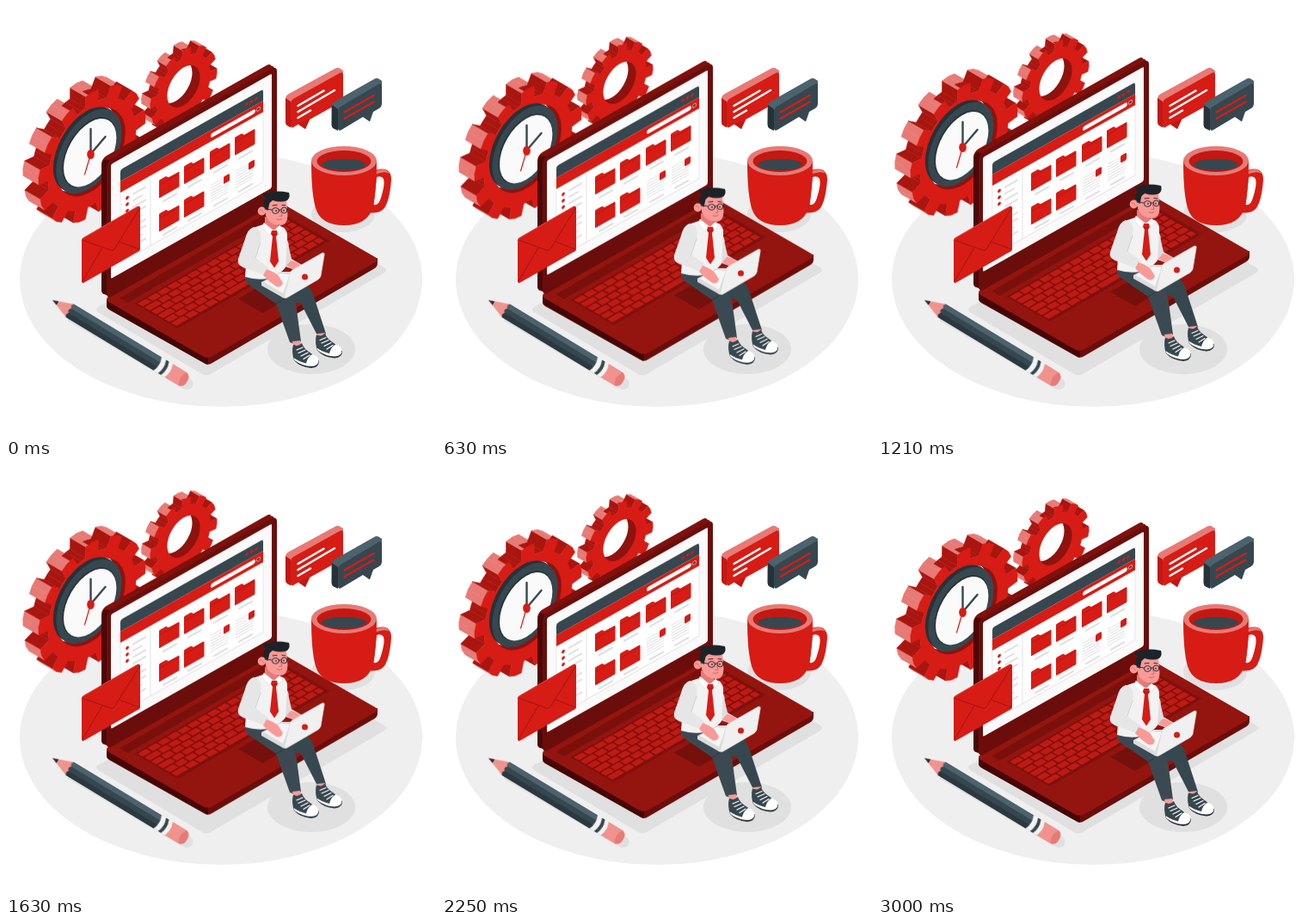
An HTML page for the animation above (3.04 s loop, 500 px wide and 500 px high).

```html
<!DOCTYPE html>
<html lang="en">
<head>
<meta charset="utf-8">
<title>Working at a laptop</title>
<style>
html, body { margin: 0; width: 100%; height: 100%; overflow: hidden; background: #fff; }
svg { display: block; width: 100%; height: 100%; }
.float { animation: float 3.04s linear infinite; }
@keyframes float {
  0%, 98.68%, 100% { transform: translateY(0); }
  49.34% { transform: translateY(-10px); }
}
.red { fill: #d61c15; }
.pink { fill: #e77a75; }
.slate { fill: #37474f; }
.night { fill: #263238; }
.skin { fill: #f99a97; }
.line { fill: none; stroke-linecap: round; stroke-linejoin: round; }
</style>
</head>
<body>
<svg viewBox="0 0 500 500">
  <defs>
    <clipPath id="hole"><circle r="22" transform="matrix(.866 -.5 0 1 206.5 93.5)"/></clipPath>
    <clipPath id="well"><circle r="46" transform="matrix(.866 -.5 0 1 99 170)"/></clipPath>
  </defs>

  <!-- floor and shadows -->
  <ellipse cx="250" cy="318" rx="234" ry="148" fill="#efefef"/>
  <g fill="#e0e0e0">
    <path d="M107 350Q103 353 107 356L228 428Q233 431 238 428L440 310Q444 307 440 304L320 236Z"/>
    <ellipse cx="355" cy="399" rx="51" ry="29"/>
    <ellipse cx="392" cy="242" rx="37" ry="21"/>
    <path d="M72 352L214 433Q220 438 216 444Q211 448 204 444L72 366Z"/>
  </g>

  <g class="float">
    <g id="smallGear"></g>
    <circle r="22" fill="#8e120e" transform="matrix(.866 -.5 0 1 206.5 93.5)"/>
    <g clip-path="url(#hole)"><circle r="22" fill="#fff" transform="matrix(.866 -.5 0 1 197.5 88.5)"/></g>

    <g id="bigGear"></g>
    <!-- clock -->
    <circle r="46" fill="#8e120e" transform="matrix(.866 -.5 0 1 99 170)"/>
    <g clip-path="url(#well)"><circle r="46" fill="#fff" transform="matrix(.866 -.5 0 1 88 164)"/></g>
    <circle r="44" class="night" transform="matrix(.866 -.5 0 1 93 166.5)"/>
    <circle r="44" class="slate" transform="matrix(.866 -.5 0 1 96.5 169)"/>
    <circle r="36.5" class="night" transform="matrix(.866 -.5 0 1 97 170)"/>
    <circle r="35.5" fill="#fafafa" transform="matrix(.866 -.5 0 1 97.7 170.700)"/>
    <g class="line">
      <path d="M98.5 172V143M98.5 172L115.5 152" stroke="#37474f" stroke-width="2.4"/>
      <path d="M98.5 172L91.5 196" stroke="#d61c15" stroke-width="1.2"/>
    </g>
    <ellipse cx="98.5" cy="172.5" rx="4.3" ry="5.5" class="red"/>

    <!-- laptop base -->
    <path d="M117 341V348.500Q117 351 120 353L231 415.500Q235 418 239 415.500L428 305.500Q432 303 432 299V293Z" fill="#6b0d0a"/>
    <path d="M117 341V348.500Q117 351 120 353L231 415.500Q233 416.800 235 416.800V400Z" fill="#450605"/>
    <g transform="matrix(.866 -.5 .866 .5 114 341)">
      <rect width="231" height="139" rx="6" fill="#94150f"/>
      <rect x="12" y="9" width="208" height="11" fill="#7a100c"/>
    </g>
    <g id="keys" transform="matrix(.866 -.5 .866 .5 153 346)">
      <rect x="-2" y="-2" width="204" height="58" fill="#7d110d"/>
      <rect x="73" y="62" width="54" height="33" fill="#76100c"/>
    </g>

    <!-- laptop lid -->
    <g id="screen" transform="matrix(1 -.565 0 1 133 190.5)">
      <g fill="#7f110d">
        <rect x="-22" y="-25.5" width="198" height="158" rx="6"/>
        <rect x="-19" y="-22.2" width="198" height="159" rx="6"/>
      </g>
      <path d="M-22 -15Q-22 -20 -19 -23L-12 -18V140L-20 133Q-22 131 -22 128Z" fill="#4c0806"/>
      <rect x="-16" y="-18.5" width="198" height="160" rx="6" fill="#6b0e0b"/>
      <rect x="-11" y="-12.5" width="187" height="133" rx="2" fill="#fafafa"/>
      <rect width="166" height="108" fill="#fff" stroke="#e3e3e3" stroke-width=".8"/>
      <path d="M0 13.500V3Q0 0 3 0H163Q166 0 166 3V13.500Z" class="slate"/>
      <path d="M0 13.500H166V26.500H0Z" class="red"/>
      <rect x="105" y="17.500" width="52" height="5" rx="2.5" fill="#fff"/>
      <circle cx="160.5" cy="20" r="2" class="slate" stroke="#f0b5b2" stroke-width=".8"/>
      <path d="M35 26.500V108" stroke="#e3e3e3"/>
    </g>

    <!-- man -->
    <g>
      <path d="M322 268Q329 270 329 281L332 294L344 301L339 308L322 302Z" fill="#dedede"/>
      <path d="M331 296Q341 298 343 303L338 308L326 302Z" class="skin"/>
      <!-- far leg -->
      <path d="M318 322L350 325Q356 329 358 338L372 381Q366 385 361 381L343 346L318 340Z" class="slate"/>
      <path d="M362 381L371 380L372 388L363 389Z" class="skin"/>
      <!-- near leg -->
      <path d="M279 310Q275 318 282 324L314 346L330 391Q337 395 343 390L338 353Q337 339 327 333L312 320Z" fill="#3b4a52"/>
      <path d="M314 346Q321 344 327 335" class="line" stroke="#263238" stroke-width=".8"/>
      <path d="M333 390L342 389L344 398L335 400Z" class="skin"/>
      <g id="shoes"></g>
      <!-- shirt, neck and tie -->
      <path d="M290 257L302 253L322 257Q328 261 327 271L325 304Q309 324 278 315L281 276Q281 262 290 257Z" fill="#f2f2f2"/>
      <path d="M301 245L317 250L316 258Q310 264 301 255Z" fill="#e77a79"/>
      <path d="M300 252L311 261L305 266L298 257ZM312 261L318 255L322 259L317 266Z" fill="#fff" stroke="#dedede" stroke-width=".6"/>
      <path d="M309 261L315 261L316 265L314 268L317 297L312 304.500L307 297L310 268L308 265Z" class="red"/>
      <path d="M309 266L315 266" stroke="#8e120e" stroke-width=".8"/>
      <!-- head -->
      <path d="M302 227Q311 221 326 225L327.500 243Q327.500 254.500 319 255Q307 255 302 244Z" class="skin"/>
      <path d="M300 235Q298 226 303 223.500Q298 221 299 217Q302 219 305 217.500Q313 214 329 217Q331 222 327 226Q320 229 310 226L306.500 229L304.500 238Z" fill="#1c2429"/>
      <ellipse cx="297.5" cy="238.5" rx="4.8" ry="5" class="skin"/>
      <path d="M295 237Q298 236 299 240" class="line" stroke="#d86865" stroke-width=".8"/>
      <g class="line" stroke="#263238">
        <path d="M301 236L309 237" stroke-width="1"/>
        <ellipse cx="313.5" cy="238" rx="4" ry="3.4" stroke-width="1"/>
        <ellipse cx="323.5" cy="237.5" rx="3.4" ry="3.4" stroke-width="1"/>
        <path d="M317.5 237H320M310 232L315 231.5M321 231.5L325 232" stroke-width="1"/>
        <path d="M319 238L321 244L318 244.5M315 248Q318 249.5 321 247.5" stroke="#c8504d" stroke-width=".7"/>
      </g>
      <circle cx="314" cy="238" r=".9" class="night"/>
      <circle cx="323" cy="237.7" r=".9" class="night"/>
      <!-- small computer -->
      <path d="M297 321L320 309L333 309L325 339Q323 341 320 338L297 325Z" fill="#dcdcdc"/>
      <path d="M300 321L319 311L330 312L322 334Z" fill="#f5f5f5"/>
      <!-- near arm -->
      <path d="M288 257Q281 259 278 271L270 294Q268 301 276 304L300 313L306 305L290 293L296 275Q299 260 288 257Z" fill="#e6e6e6"/>
      <path d="M290 293L296 275" class="line" stroke="#cfcfcf" stroke-width=".9"/>
      <path d="M303 306Q312 309 317 314L322 322Q320 328 314 326L306 320L299 313Z" class="skin"/>
      <path d="M333 307L368 287Q371 286.500 370 290L366 314Q365 316.500 363 318L327 339Q323 341 324 337L330 311Q331 308 333 307Z" fill="#f0f0f0" stroke="#dcdcdc" stroke-width=".7"/>
      <circle cx="347.5" cy="315" r="3.5" class="red"/>
    </g>
  </g>

  <!-- envelope -->
  <path d="M88 273Q88 270 91 269L153 233Q156 232 156 235V282Q156 285 153 286L91 321.500Q88 323 88 320Z" class="red"/>
  <path d="M88.500 272L122 284Q125 285 127 281L155.500 235M89 320L112 281M155 283L132 274" class="line" stroke="#a5130f" stroke-width="1"/>
  <path d="M88 273Q88 270 91 269L153 233.200" class="line" stroke="#e44a43" stroke-width="1"/>

  <!-- mug -->
  <path fill-rule="evenodd" class="red" d="M428 191Q448 185 448 202Q446 228 439 236Q433 242 419 240ZM431 199L427.500 231Q433 233 436 223Q441 207 439 201Q437 197 431 199Z"/>
  <path d="M429 192Q442 187 446 195Q441 191 429 196Z" class="pink"/>
  <path d="M355 180Q355 218 360 235Q366 255 393 255Q420 255 426 235Q431 218 431 180Z" class="red"/>
  <ellipse cx="393" cy="180" rx="38" ry="17" class="pink"/>
  <ellipse cx="393" cy="180.500" rx="31.500" ry="12.500" fill="#c41812"/>
  <ellipse cx="393" cy="184.500" rx="26" ry="6.800" class="slate"/>

  <!-- speech bubbles -->
  <path d="M325 108Q325 104 329 102L383 72.500Q386 71 388 72.500L392 75V90L331 120L325 137Z" class="pink"/>
  <path d="M331 113Q331 110 334 108L388 78Q392 76 392 80V107Q392 110 389 112L353 132L348 143L340 137.500L334 141Q331 142 331 139Z" class="red"/>
  <path d="M340 137.500L346 134.500L353 132L348 143Z" fill="#c01913"/>
  <path d="M325 107L331 111V141.500L327 139Q325 138 325 135Z" fill="#c01913"/>
  <path d="M339.500 116L369.500 98.500M339.500 123L382 98M339.500 130L354 121.500" class="line" stroke="#fff" stroke-width="2.500"/>

  <path d="M378.500 117Q378.500 113 382 111L428 85Q431 83 434 85L437 87V100L386 130L379 140Z" fill="#4c626d"/>
  <path d="M379 115L386 120V145L381 142.500Q378.500 141 378.500 138Z" class="night"/>
  <path d="M386 122Q386 119 389 117L433 91Q437 88.500 437 93V114Q437 117 434 119L427 123L423 134.500L415 129L390 144Q386 146 386 142Z" class="slate"/>
  <path d="M393.500 123.500L427.500 104M393.500 131L427.500 111.500" class="line" stroke="#d61c15" stroke-width="2.200"/>

  <!-- pencil -->
  <g transform="translate(54 342) rotate(31.2)">
    <path d="M0 0L24 -9L27 0L24 9Z" fill="#f0938f"/>
    <path d="M0 0L7 -2.600V2.600Z" class="night"/>
    <path d="M24 -9H146V9H24Q21 6 24 3Q20 0 24 -3Q21 -6 24 -9Z" class="slate"/>
    <path d="M24 -9H146V-3H24Q21 -6 24 -9Z" fill="#4c626d"/>
    <path d="M24 3H146V9H24Q21 6 24 3Z" fill="#2b383f"/>
    <path d="M143 -9H160V9H143Q147 0 143 -9Z" fill="#f2f2f2"/>
    <path d="M149 -9H153Q157 0 153 9H149Q153 0 149 -9Z" class="slate"/>
    <path d="M158 -9H176Q183 -8 183 0Q183 8 176 9H158Q162 0 158 -9Z" fill="#f0938f"/>
    <path d="M177 -9Q171 0 177 9Q183 8 183 0Q183 -8 177 -9Z" fill="#e77a75"/>
  </g>
</svg>
<script>
const $ = id => document.getElementById(id);
const add = (id, markup) => $(id).insertAdjacentHTML('beforeend', markup);
const rect = (x, y, w, h, fill, rx = 0) =>
  `<rect x="${x}" y="${y}" width="${w}" height="${h}" rx="${rx}" fill="${fill}"/>`;

// Gear on the right-hand isometric plane, extruded up and to the left.
function gear(id, cx, cy, outer, root, depth, teeth, turn) {
  const step = Math.PI * 2 / teeth;
  const shape = [[-.3, root], [-.24, outer], [0, outer * 1.01], [.24, outer], [.3, root], [.5, root]];
  const pts = [];
  for (let i = 0; i < teeth; i++) {
    for (const [k, r] of shape) {
      const a = turn - Math.PI / 2 + (i + k) * step, u = r * Math.cos(a), v = r * Math.sin(a);
      pts.push([cx + .866 * u, cy - .5 * u + v]);
    }
  }
  const poly = (list, fill) =>
    `<polygon points="${list.map(p => p.map(n => n.toFixed(1))).join(' ')}" fill="${fill}" stroke="${fill}" stroke-width=".5"/>`;
  const back = ([x, y]) => [x - .866 * depth, y - .5 * depth];
  let out = '';
  pts.forEach((p, i) => {
    const q = pts[(i + 1) % pts.length], part = i % shape.length;
    if (.5 * (q[0] - p[0]) - .866 * (q[1] - p[1]) <= 0) return;
    const tip = part === 1 || part === 2;
    out += poly([p, q, back(q), back(p)], tip ? '#e77a75' : '#a9150f');
  });
  add(id, out + poly(pts, '#d61c15'));
}
gear('smallGear', 206.5, 96, 44.5, 36, 12, 12, .1);
gear('bigGear', 100, 172.5, 71.5, 59, 21, 13, 0);

// Keyboard
let keys = '';
for (let row = 0; row < 6; row++) {
  const shift = row % 2 ? 5 : 0;
  for (let col = 0; col < 15; col++) {
    if (row === 5 && col > 4 && col < 10) continue;
    const x = col ? col * 13.3 + shift : 0;
    const end = col === 14 ? 200 : (col + 1) * 13.3 + shift;
    keys += rect(x, row * 9, end - x - 1.8, 7.2, '#bf1a14', 1);
  }
}
add('keys', keys + rect(71.5, 45, 64.7, 7.2, '#bf1a14', 1));

// Screen contents
let ui = '';
for (const x of [147, 152.5, 158]) ui += `<circle cx="${x}" cy="6.5" r="1.8" class="red"/>`;
for (let i = 0; i < 9; i++) {
  const y = 35.5 + i * 7.5;
  if (i < 3) ui += `<circle cx="8" cy="${y + 1.5}" r="1.9" class="red"/>`;
  ui += rect(14, y, i % 3 === 1 ? 12 : 16, 2.2, '#e0e0e0', 1);
}
const caption = (x, y) => rect(x + 4, y + 26, 17, 2.4, '#e0e0e0', 1);
const folder = (x, y) =>
  `<path transform="translate(${x} ${y})" class="red" d="M0 1Q0 0 1 0H8L11 3H22Q23.500 3 23.500 4.500V20Q23.500 21 22.500 21H1Q0 21 0 20Z"/>` +
  `<path transform="translate(${x} ${y})" d="M.5 5.500H23" stroke="#b21711" stroke-width=".7"/>` +
  caption(x, y);
const doc = (x, y) => {
  let s = rect(x + 16, y, 7, 8.5, '#d61c15', 1.5);
  for (let i = 0; i < 7; i++) s += rect(x + 1, y + 1 + i * 3.2, i < 3 ? 13 : 20, .9, '#dcdcdc');
  return s + caption(x, y);
};
for (const x of [45, 74, 104, 133]) {
  ui += folder(x, 37.5) + (x < 100 ? folder(x, 76.5) : doc(x, 76));
}
add('screen', ui);

// Shoes share one drawing
const shoe = (x, y) => `<g transform="translate(${x} ${y})">
  <path d="M1 3Q-1 12 2 21Q9 29 22 30Q31 29 31 22L23 14L12 6Z" class="night"/>
  <path d="M1.500 18L2.500 21Q11 27.500 22 28Q30 27.500 30.500 22Z" fill="#fff"/>
  <path d="M1 3Q6 6 11 1Q13 8 23 14L18 25Q8 23 1.500 18Q0 9 1 3Z" class="slate"/>
  <path d="M23 14Q30 16 30.500 21Q25 27 16 25Q17 18 23 14Z" fill="#fff"/>
  <path d="M5 9L12 6M7 12.500L15 9M10 16L18 12M13 19.500L20 15" class="line" stroke="#fff" stroke-width="1.200"/></g>`;
add('shoes', shoe(360, 379.5) + shoe(333, 391));
</script>
</body>
</html>
```
